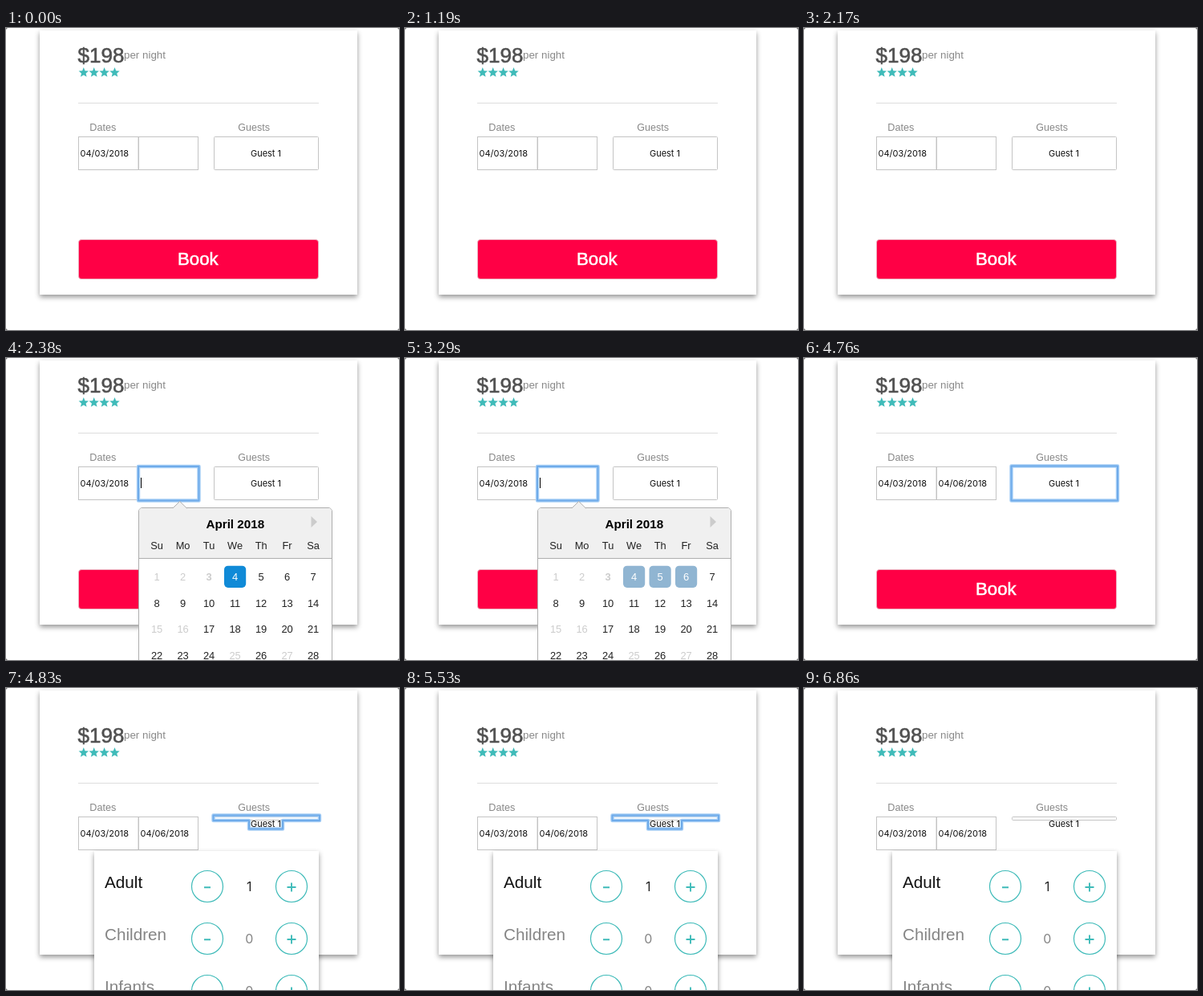
Animation, 490 px wide and 376 px high, one loop 8 s. Source, as an HTML page:

```html
<!DOCTYPE html>
<html lang="en">
<head>
<meta charset="utf-8">
<title>Booking form</title>
<style>
  html, body { margin: 0; width: 100%; height: 100%; overflow: hidden; background: #fff; }
  svg { display: block; width: 490px; height: 376px; }
  text { font-family: "Liberation Sans", Arial, sans-serif; white-space: pre; }
  .ui { font-family: Inter, "Noto Sans", sans-serif; }
  .mid { text-anchor: middle; }
  .shadow { filter: drop-shadow(0 3px 3px rgba(0, 0, 0, .42)); }
  .halo { fill: none; stroke: #a9d0f6; stroke-width: 4.5; stroke-linejoin: round; }
  .ring { fill: none; stroke: #6fabea; stroke-width: 2; stroke-linejoin: round; }
</style>
</head>
<body>
<svg id="stage" viewBox="0 0 490 376" xmlns="http://www.w3.org/2000/svg"></svg>
<script>
const LOOP = 8000;
const T = { calendar: 2380, caretOff: 2800, hoverA: 3080, hoverB: 3150, caretOn: 3290,
            picked: 3570, focus: 4760, open: 4830, blur: 6300 };
const TEAL = '#3fbbb9', GREY = '#888', EDGE = '#c4c4c4';
const stage = document.getElementById('stage');

function add(parent, tag, attrs = {}, content) {
  const el = document.createElementNS('http://www.w3.org/2000/svg', tag);
  for (const key in attrs) el.setAttribute(key, attrs[key]);
  if (content !== undefined) el.textContent = content;
  parent.appendChild(el);
  return el;
}
const group = parent => add(parent, 'g');
const box = (parent, x, y, width, height, attrs) =>
  add(parent, 'rect', { x, y, width, height, ...attrs });
const label = (parent, x, y, size, fill, str, attrs) =>
  add(parent, 'text', { x, y, 'font-size': size, fill, ...attrs }, str);
const path = (parent, d, attrs) => add(parent, 'path', { d, ...attrs });
const show = (el, on) => el.setAttribute('visibility', on ? 'visible' : 'hidden');

function focusRing(parent, d) {
  const g = group(parent);
  path(g, d, { class: 'halo' });
  path(g, d, { class: 'ring' });
  return g;
}

function star(parent, cx, cy) {
  let d = '';
  for (let i = 0; i < 10; i++) {
    const r = i % 2 ? 2.9 : 6.5, a = i * Math.PI / 5;
    d += (i ? 'L' : 'M') + (cx + r * Math.sin(a)).toFixed(2) + ' ' + (cy - r * Math.cos(a)).toFixed(2);
  }
  path(parent, d + 'Z', { fill: TEAL });
}

// Card and its content
box(stage, 0, 0, 490, 376, { fill: '#fff' });
path(stage, 'M0 0h2l-2 2ZM490 0v2l-2 -2ZM0 376v-2l2 2ZM490 376h-2l2 -2Z', { fill: '#777' });
box(stage, 42, 3, 396, 329, { fill: '#fff', class: 'shadow' });

const form = group(stage);
label(form, 89.5, 43, 26, '#505050', '$198', { stroke: '#505050', 'stroke-width': .6 });
label(form, 147, 38, 13.35, GREY, 'per night');
for (let i = 0; i < 4; i++) star(form, 96.8 + i * 12.9, 55.5);
box(form, 90, 93, 300, 1, { fill: '#dedede' });
label(form, 104.3, 128, 12.6, GREY, 'Dates');
label(form, 289.3, 128, 12.5, GREY, 'Guests');
const field = { fill: '#fff', stroke: EDGE };
box(form, 90.5, 135.5, 74.5, 41, field);
box(form, 165.5, 135.5, 74, 41, field);
label(form, 92.5, 160, 11, '#111', '04/03/2018', { class: 'ui' });
const endDate = label(form, 167.5, 160, 11, '#111', '04/06/2018', { class: 'ui' });
const guestBox = box(form, 259.5, 135.5, 130, 41, { ...field, rx: 1 });
const guestRing = focusRing(form, 'M258.5 134.5H391V177.5H258.5Z');
const thinRing = focusRing(form, 'M258.5 133.5H391V140H345V150.5H303V140H258.5Z');
const guestText = label(form, 324, 160, 11, '#111', 'Guest 1', { class: 'ui mid' });

const button = group(stage);
box(button, 90.5, 263.5, 299, 49, { rx: 3.5, fill: '#ff0045', stroke: '#e9b9c5', 'stroke-width': .8 });
label(button, 239.3, 295, 22.2, '#fff', 'Book', { class: 'mid', stroke: '#fff', 'stroke-width': .6 });

// Calendar popup
const calendar = group(stage);
focusRing(calendar, 'M165 135H240.5V177.5H165Z');
const caret = box(calendar, 168, 149, 1, 13, { fill: '#000' });
box(calendar, 165.5, 186.5, 241, 220, { rx: 4.5, fill: '#fff', stroke: '#aeaeae' });
path(calendar, 'M166 249V191a4 4 0 0 1 4 -4H402a4 4 0 0 1 4 4V249Z', { fill: '#f0f0f0' });
box(calendar, 166, 249, 240, 1, { fill: '#aeaeae' });
path(calendar, 'M208 187L216.7 178.5L225.4 187', { fill: '#f0f0f0', stroke: '#aeaeae' });
box(calendar, 208.5, 187, 16.5, 1, { fill: '#f0f0f0' });
label(calendar, 285.8, 212, 15.2, '#000', 'April 2018', { class: 'mid', 'font-weight': 'bold' });
path(calendar, 'M380.5 197V211L388 204Z', { fill: '#ccc' });

const STEP = 32.5, column = i => 188.1 + i * STEP;
['Su', 'Mo', 'Tu', 'We', 'Th', 'Fr', 'Sa'].forEach((name, i) =>
  label(calendar, column(i), 238, 12.8, '#222', name, { class: 'mid' }));
const closed = [1, 2, 3, 15, 16, 25, 27];
const cells = {}, digits = {};
for (let day = 1; day <= 28; day++) {
  const x = column((day - 1) % 7), y = 272.3 + Math.floor((day - 1) / 7) * STEP;
  if (day >= 4 && day <= 6) cells[day] = box(calendar, x - 13.6, y - 13.6, 27.2, 27.2, { rx: 4.8 });
  digits[day] = label(calendar, x, y + 4.7, 12.9, closed.includes(day) ? '#ccc' : '#222', day,
    { class: 'mid', 'font-weight': day === 3 ? 'bold' : 'normal' });
}

// Guest counter popup
const panel = group(stage);
box(panel, 110, 203, 280, 230, { fill: '#fff', class: 'shadow' });
['Adult', 'Children', 'Infants'].forEach((name, i) => {
  const y = 247 + i * 65, tone = i ? '#858585' : '#222';
  label(panel, 123, y + 2, 20.7, i ? tone : '#111', name);
  for (const x of [251, 356])
    add(panel, 'circle', { cx: x, cy: y, r: 19.5, fill: '#fff', stroke: TEAL, 'stroke-width': 1.2 });
  path(panel, `M247 ${y + 1.3}h8M350.5 ${y + 1}h11M356 ${y - 4.5}v11`,
    { fill: 'none', stroke: TEAL, 'stroke-width': 1.9 });
  label(panel, 303.3, y + 6, 16, tone, i ? 0 : 1, { class: 'ui mid' });
});

function render(t) {
  const within = (a, b) => t >= a && t < b;
  const picking = within(T.calendar, T.picked);
  const open = t >= T.open;
  const lastHover = t < T.hoverA ? 0 : t < T.hoverB ? 5 : 6;

  show(calendar, picking);
  show(caret, picking && !within(T.caretOff, T.caretOn));
  for (const day in cells) {
    const inRange = day <= lastHover, current = !lastHover && day === '4';
    cells[day].setAttribute('fill', inRange ? '#90b5d2' : current ? '#108ad7' : 'none');
    digits[day].setAttribute('fill', inRange || current ? '#fff' : '#222');
  }

  form.setAttribute('transform', `translate(0 ${open ? 25 : 0})`);
  show(endDate, t >= T.picked);
  guestBox.setAttribute('height', open ? 4 : 41);
  guestText.setAttribute('y', open ? 148 : 160);
  show(guestRing, within(T.focus, T.open));
  show(thinRing, within(T.open, T.blur));
  show(button, !open);
  show(panel, open);
}

function frame() {
  render(performance.now() % LOOP);
  requestAnimationFrame(frame);
}
frame();
</script>
</body>
</html>
```
